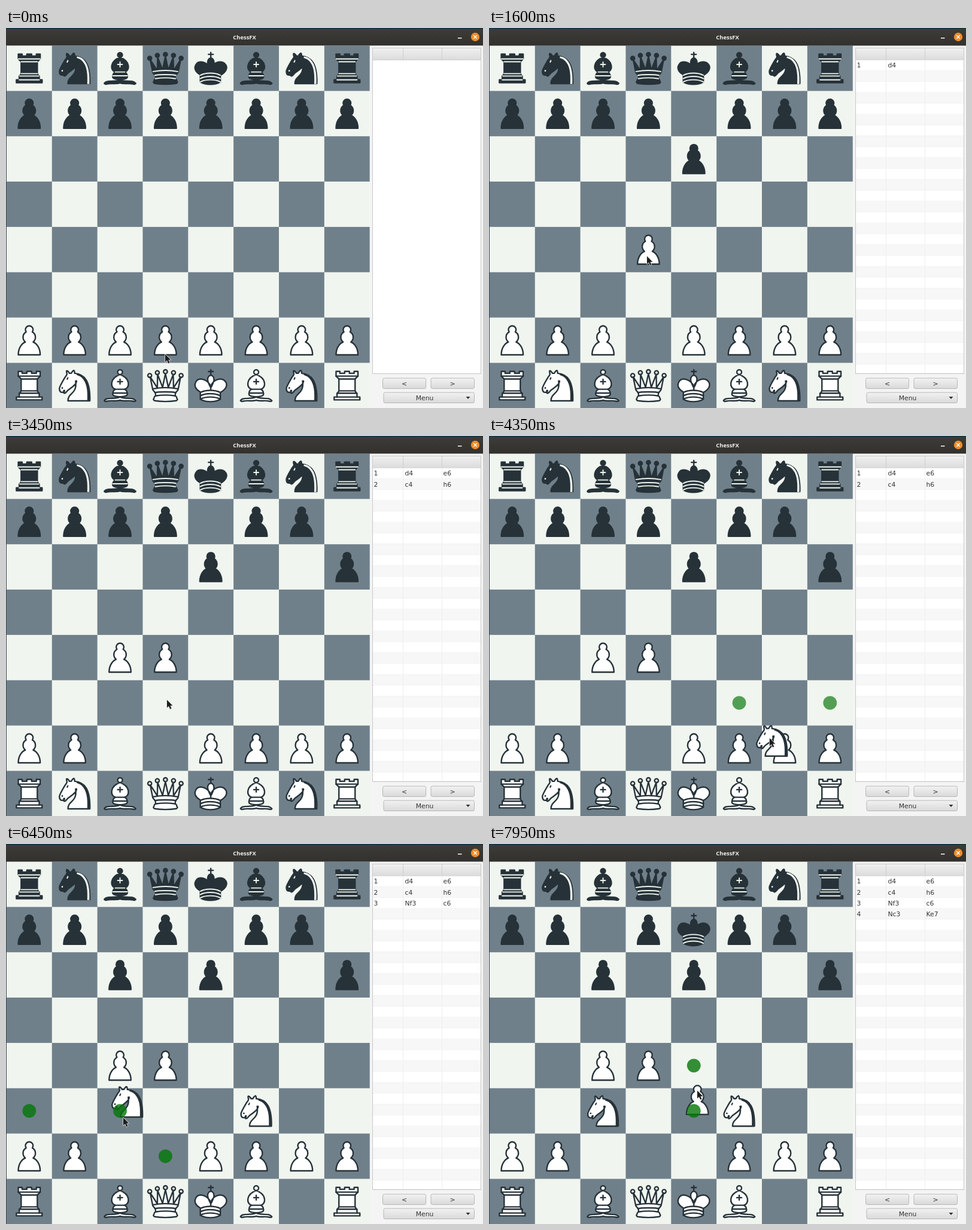
Animation, 797 px wide and 636 px high, one loop 8000 ms. Source, as an HTML page with a canvas:

```html
<!DOCTYPE html>
<html>
<head>
<meta charset="utf-8">
<title>ChessFX</title>
<style>
html, body { margin: 0; width: 100%; height: 100%; overflow: hidden; }
canvas { display: block; }
</style>
</head>
<body>
<canvas id="stage" width="797" height="636"></canvas>
<script>
const g = document.getElementById('stage').getContext('2d');
const LOOP = 8000, CELL = 75.85, LEFT = .9, TOP = 29.5, SCALE = 1.59;
const DARK = '#263238', PALE = '#f0f5ef', SLATE = '#70808b';

// Piece outlines in a 45-unit box: middle, body, inner lines, dark marks, solid details.
const ball = (x, y, r) => `M${x - r} ${y}a${r} ${r} 0 1 1 ${2 * r} 0a${r} ${r} 0 1 1 ${-2 * r} 0Z`;
const shapes = {
  p: {
    mid: [22.5, 24.25],
    body: 'M22.5 9c-2.21 0-4 1.79-4 4 0 .89.29 1.71.78 2.38C17.33 16.5 16 18.59 16 21c0 2.03.94 3.84 2.41 5.03' +
      'C15.41 27.09 11 31.58 11 39.5H34c0-7.92-4.41-12.41-7.41-13.47C28.06 24.84 29 23.03 29 21' +
      'c0-2.41-1.33-4.5-3.28-5.62.49-.67.78-1.49.78-2.38 0-2.21-1.79-4-4-4z'
  },
  r: {
    mid: [22.5, 24],
    body: 'M9 39h27v-3h-3v-4h-.5L31 29.5V17l3-3V9h-4v2h-5V9h-5v2h-5V9h-4v5l3 3v12.5L12.5 32H12v4H9Z',
    lines: 'M11 14h23M14 17h17M14 29.5h17M12.5 32h20M12 36h21'
  },
  n: {
    mid: [22, 23],
    body: 'M22 10c10.5 1 16.5 8 16 29H15c0-9 10-6.5 8-21' +
      'M24 18c.38 2.91-5.55 7.37-8 9-3 2-2.82 4.34-5 4-1.04-.94 1.41-3.04 0-3-1 0 .19 1.23-1 2-1 0-4 1-4-4' +
      ' 0-2 6-12 6-12s1.89-1.9 2-3.5c-.73-1-.5-2-.5-3 1-1 3 2.5 3 2.5h2s.78-2 2.5-3c1 0 1 3 1 3',
    solid: 'M24.55 10.4l-.45 1.45.5.15c3.15 1 5.65 2.49 7.9 6.75S35.75 29.06 35.25 39l-.05.5h2.25l.05-.5' +
      'c.5-10.06-.88-16.85-3.25-21.34-2.37-4.49-5.79-6.64-9.19-7.16z' +
      ball(9, 25.5, .9) + 'M15.6 14.6L14.6 17.1L13.4 16.4L14.6 13.9Z'
  },
  b: {
    mid: [22.5, 22.2],
    body: 'M9 36c3.39-.97 10.11.43 13.5-2 3.39 2.43 10.11 1.03 13.5 2 0 0 1.65.54 3 2-.68.97-1.65.99-3 .5' +
      '-3.39-.97-10.11.46-13.5-1-3.39 1.46-10.11.03-13.5 1-1.35.49-2.32.47-3-.5 1.35-1.94 3-2 3-2z' +
      'M15 32c2.5 2.5 12.5 2.5 15 0 .5-1.5 0-2 0-2 0-2.5-2.5-4-2.5-4 5.5-1.5 6-11.5-5-15.5' +
      '-11 4-10.5 14-5 15.5 0 0-2.5 1.5-2.5 4 0 0-.5.5 0 2z' + ball(22.5, 8, 2.5),
    lines: 'M17.5 26h10M15 30h15m-7.5-14.5v5M20 18h5'
  },
  q: {
    mid: [22.5, 22.7],
    body: [[6, 12], [14, 9], [22.5, 8], [31, 9], [39, 12]].map(b => ball(...b, 2)).join('') +
      'M9 26l-2.5-12.5L14 25l.3-14.1 5.2 13.6 3-14.5 3 14.5 5.2-13.6L31 25l7.5-11.5L36 26c0 2-1.5 2-2.5 4' +
      '-1 1.5-1 1-.5 3.5 1.5 1 1.5 2.5 1.5 2.5 1.5 1.5-.5 2.5-.5 2.5-6.5 1-16.5 1-23 0 0 0-2-1-.5-2.5' +
      ' 0 0 0-1.5 1.5-2.5.5-2.5.5-2-.5-3.5-1-2-2.5-2-2.5-4z',
    lines: 'M9.5 26c8-1.5 18-1.5 26 0M11.5 30c3.5-1 18.5-1 22 0M12 33.5c6-1 15-1 21 0'
  },
  k: {
    mid: [22.5, 22.8],
    body: 'M22.5 25s4.5-7.5 3-10.5c0 0-1-2.5-3-2.5s-3 2.5-3 2.5c-1.5 3 3 10.5 3 10.5' +
      'M11.5 37c5.5 3.5 15.5 3.5 21 0v-7s9-4.5 6-10.5c-4-6.5-13.5-3.5-16 4V27v-3.5' +
      'c-3.5-7.5-13-10.5-16-4-3 6 5 10 5 10V37z',
    lines: 'M11.5 30c5.5-3 15.5-3 21 0m-21 3.5c5.5-3 15.5-3 21 0m-21 3.5c5.5-3 15.5-3 21 0',
    mark: 'M22.5 11.63V6M20 8h5'
  }
};
for (const shape of Object.values(shapes))
  for (const part of ['body', 'lines', 'mark', 'solid']) shape[part] = new Path2D(shape[part] || '');

const square = s => ({ x: LEFT + (s.charCodeAt(0) - 97) * CELL, y: TOP + (8 - s[1]) * CELL });

const home = [];
[...'rnbqkbnr'].forEach((type, i) => {
  const file = 'abcdefgh'[i];
  home.push({ type, at: file + 8 }, { type: 'p', at: file + 7 },
    { type: 'p', at: file + 2, white: true }, { type, at: file + 1, white: true });
});

// from, to, grab, drop, hints, label
const drags = [
  ['d2', 'd4', 450, 1000, ['d3', 'd4'], 'd4'],
  ['c2', 'c4', 2200, 2700, ['c3', 'c4'], 'c4'],
  ['g1', 'f3', 4150, 4620, ['f3', 'h3'], 'Nf3'],
  ['b1', 'c3', 5950, 6650, ['a3', 'c3', 'd2'], 'Nc3'],
  ['e2', 'e4', 7700, 9000, ['e3', 'e4'], 'e4']
];
// from, to, start, label
const replies = [
  ['e7', 'e6', 1300, 'e6'], ['h7', 'h6', 3050, 'h6'],
  ['c7', 'c6', 4900, 'c6'], ['e8', 'e7', 6900, 'Ke7']
];
const SLIDE = 280, NOTE_DELAY = 350;

// Pointer: time, x, y
const path = [
  [0, 266, 546], [150, 266, 546], [250, 264, 545], [450, 264, 545], [700, 259, 470],
  [1000, 264, 382], [1600, 264, 382], [2050, 208, 530], [2150, 194, 534], [2200, 194, 534],
  [2600, 196, 398], [2700, 196, 390], [3250, 196, 390], [3650, 380, 520], [4000, 490, 594],
  [4150, 490, 594], [4350, 469, 506], [4600, 416, 452], [4700, 416, 452], [5300, 260, 545],
  [5550, 172, 602], [5700, 100, 630], [5850, 108, 625], [5950, 108, 625], [6450, 196, 458],
  [6650, 195, 460], [7100, 195, 460], [7600, 342, 507], [7700, 342, 507], [7950, 348, 413], [8000, 348, 400]
];

function pointer(t) {
  let i = path.findIndex(p => p[0] > t) - 1;
  if (i < 0) i = path.length - 2;
  const a = path[i], b = path[i + 1], span = b[0] - a[0], u = (t - a[0]) / span;
  const value = c => {
    const slope = n => {
      const p = path[n - 1], q = path[n], r = path[n + 1];
      if (!p || !r || (q[c] - p[c]) * (r[c] - q[c]) <= 0) return 0;
      return (r[c] - p[c]) / (r[0] - p[0]) * span;
    };
    const d = b[c] - a[c], m = slope(i), n = slope(i + 1);
    return a[c] + u * (m + u * (3 * d - 2 * m - n + u * (m + n - 2 * d)));
  };
  return { x: value(1), y: value(2) };
}

function rect(x, y, w, h, color) {
  g.fillStyle = color;
  g.fillRect(x, y, w, h);
}

function fade(y, h, top, bottom) {
  const f = g.createLinearGradient(0, y, 0, y + h);
  f.addColorStop(0, top);
  f.addColorStop(1, bottom);
  return f;
}

function text(s, x, y, font = '10.8px "DejaVu Sans", sans-serif', color = '#333', align = 'left') {
  g.font = font;
  g.fillStyle = color;
  g.textAlign = align;
  g.fillText(s, x, y);
}

function drawPiece({ type, white }, { x, y }) {
  const { mid, body, lines, mark, solid } = shapes[type];
  g.save();
  g.translate(x + CELL / 2, y + CELL / 2 + .2);
  g.scale(SCALE, SCALE);
  g.translate(-mid[0], -mid[1]);
  g.lineJoin = g.lineCap = 'round';
  g.lineWidth = 1.5;
  g.fillStyle = white ? '#fff' : DARK;
  g.strokeStyle = DARK;
  g.fill(body);
  g.stroke(body);
  g.stroke(mark);
  g.lineWidth = white ? 1.5 : 1.2;
  g.strokeStyle = g.fillStyle = white ? DARK : PALE;
  g.stroke(lines);
  g.fill(solid);
  g.restore();
}

function drawTitle() {
  rect(0, 0, 797, 29.4, fade(1, 28, '#3d3c38', '#32312d'));
  rect(0, 0, 797, 1.3, '#0c2a3d');
  text('ChessFX', 398.5, 18.5, 'bold 9.4px "Noto Sans", "Open Sans", sans-serif', '#f4f2ee', 'center');
  rect(755, 16, 6.5, 1.7, '#e8e6e2');
  g.fillStyle = '#f08c28';
  g.beginPath();
  g.arc(784, 15, 7.2, 0, 7);
  g.fill();
  g.strokeStyle = '#fff';
  g.lineWidth = 1.4;
  g.stroke(new Path2D('M781.3 12.3l5.4 5.4m0-5.4l-5.4 5.4'));
}

function button(x, y, w, label, mid) {
  g.beginPath();
  g.roundRect(x + .5, y + .5, w - 1, 17.5, 2.5);
  g.fillStyle = fade(y, 18, '#f3f3f3', '#d9d9d9');
  g.fill();
  g.strokeStyle = '#b8b8b8';
  g.lineWidth = 1;
  g.stroke();
  text(label, mid, y + 13, undefined, '#333', 'center');
}

function drawPanel(t) {
  rect(608, 29.4, 189, 607, '#f4f4f4');
  rect(612, 33, 182, 546, '#c8c8c8');
  rect(613, 34, 180, 544, '#fff');
  rect(613, 34, 180, 19, fade(34, 19, '#f0f0f0', '#dcdcdc'));
  rect(613, 53, 180, 1, '#cdcdcd');
  for (const x of [663, 728]) rect(x, 34, 1, 19, '#cecece');

  if (t >= drags[0][3]) {
    const step = 18.2;
    for (let y = 53.7, i = 0; y < 578; y += step, i++) {
      const h = Math.min(step, 578 - y);
      rect(613, y, 180, h, i % 2 ? '#f7f7f7' : '#fff');
      rect(613, y + h - 1, 180, 1, '#f2f2f2');
    }
    for (const x of [663, 728]) rect(x, 54, 1, 524, '#eee');
    drags.forEach((d, i) => {
      const y = 66.3 + i * step, r = replies[i];
      if (t < d[3]) return;
      text(i + 1, 614.5, y);
      text(d[5], 666.5, y);
      if (t >= r[2] + NOTE_DELAY) text(r[3], 730.5, y);
    });
  }
  button(629, 585.5, 73, '<', 665.5);
  button(709.5, 585.5, 73.5, '>', 746);
  button(630.5, 609.5, 152.5, 'Menu', 699.5);
  g.fillStyle = '#333';
  g.fill(new Path2D('M768.5 617h7l-3.5 4Z'));
}

function drawBoard(t, mouse) {
  rect(0, 29.4, 1, 607, '#173040');
  rect(LEFT, TOP, CELL * 8, CELL * 8, PALE);
  for (let i = 0; i < 64; i++) {
    const c = i % 8, r = i >> 3;
    if ((c + r) % 2) rect(LEFT + c * CELL, TOP + r * CELL, CELL, CELL, SLATE);
  }

  let held;
  for (const piece of home) {
    let pos = square(piece.at);
    const moves = piece.white ? drags : replies;
    const move = moves.find(m => m[0] === piece.at);
    if (move && t >= move[2]) {
      const goal = square(move[1]);
      if (!piece.white) {
        const k = Math.min(1, (t - move[2]) / SLIDE);
        pos.y += (goal.y - pos.y) * k;
      } else if (t >= move[3]) {
        pos = goal;
      } else {
        const start = pointer(move[2]);
        pos.x += mouse.x - start.x;
        pos.y += mouse.y - start.y;
        held = { piece, pos, move };
        continue;
      }
    }
    drawPiece(piece, pos);
  }
  if (!held) return;

  drawPiece(held.piece, held.pos);
  g.globalAlpha = .8 * Math.min(1, (t - held.move[2]) / 240);
  g.fillStyle = '#047508';
  for (const s of held.move[4]) {
    const { x, y } = square(s);
    g.beginPath();
    g.arc(x + CELL / 2, y + CELL / 2, 11.4, 0, 7);
    g.fill();
  }
  g.globalAlpha = 1;
}

const arrow = new Path2D('M0 0V13L3 10.3L5.2 15.2L7.5 14.2L5.3 9.5H9.3Z');

function frame(now) {
  const t = now % LOOP, mouse = pointer(t);
  drawBoard(t, mouse);
  drawPanel(t);
  drawTitle();
  g.save();
  g.translate(mouse.x, mouse.y);
  g.lineJoin = 'round';
  g.lineWidth = 1.4;
  g.strokeStyle = '#e8e8e8';
  g.stroke(arrow);
  g.fillStyle = '#1c1c1c';
  g.fill(arrow);
  g.restore();
  requestAnimationFrame(frame);
}
requestAnimationFrame(frame);
</script>
</body>
</html>
```
